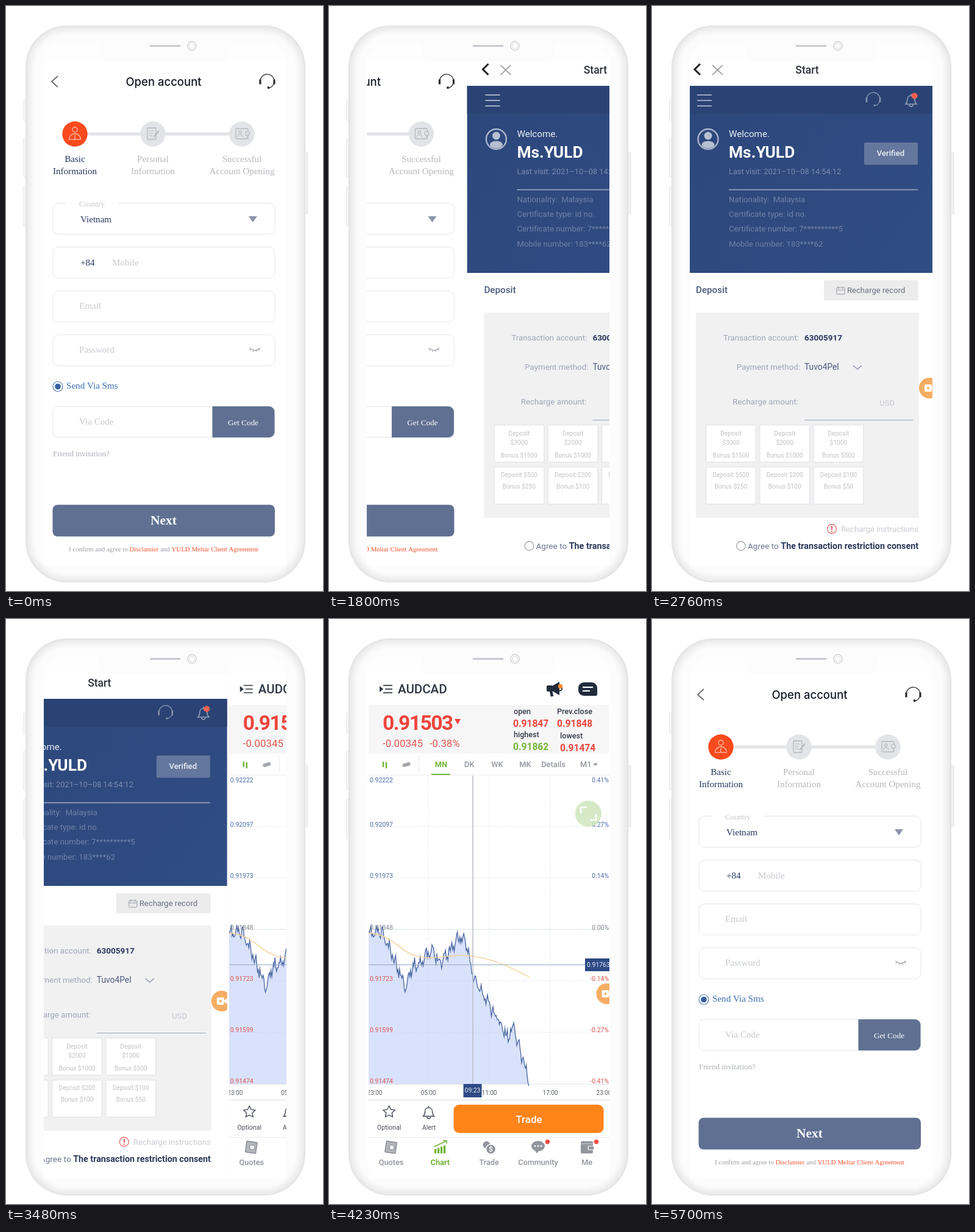
Write an HTML page with a canvas that moves like this. It is 520 px wide and 960 px high and loops after 5730 ms.

```html
<!DOCTYPE html>
<html lang="en">
<head>
<meta charset="utf-8">
<title>Trading app walkthrough</title>
<style>
html, body { margin: 0; width: 100%; height: 100%; overflow: hidden; background: #fff; }
canvas { display: block; width: 520px; height: 960px; }
</style>
</head>
<body>
<canvas id="stage" width="520" height="960"></canvas>
<script>
const c = document.getElementById('stage').getContext('2d');
const LOOP = 5730, SLIDE = 470, PI = Math.PI;
const serif = (n, w = 400) => `${w} ${n}px "Liberation Serif", serif`;
const sans = (n, w = 400) => `${w} ${n}px Roboto, sans-serif`;
const clamp = (v, lo, hi) => Math.min(hi, Math.max(lo, v));

function text(s, x, y, font, color, align = 'left') {
  c.font = font;
  c.fillStyle = color;
  c.textAlign = align;
  c.fillText(s, x, y);
}
function paint(fill, stroke, w = 1) {
  if (fill) { c.fillStyle = fill; c.fill(); }
  if (stroke) { c.strokeStyle = stroke; c.lineWidth = w; c.stroke(); }
}
function rect(x, y, w, h, color) {
  c.fillStyle = color;
  c.fillRect(x, y, w, h);
}
function box(x, y, w, h, r, fill, stroke, lw) {
  c.beginPath();
  c.roundRect(x, y, w, h, r);
  paint(fill, stroke, lw);
}
function disc(x, y, r, fill, stroke, lw) {
  c.beginPath();
  c.arc(x, y, r, 0, 2 * PI);
  paint(fill, stroke, lw);
}
function arc(x, y, r, a, b, color, w) {
  c.beginPath();
  c.arc(x, y, r, a * PI, b * PI);
  paint(null, color, w);
}
function path(points) {
  c.beginPath();
  for (const [x, y] of points) c.lineTo(x, y);
}
function seg(x, y, u, v, color, w) { path([[x, y], [u, v]]); paint(null, color, w); }
const hline = (x, u, y, color, w) => seg(x, y, u, y, color, w);
const vline = (x, y, v, color, w) => seg(x, y, x, v, color, w);

// A tip with two arms, opening right or up
const openRight = (x, y, dx, dy) => path([[x + dx, y - dy], [x, y], [x + dx, y + dy]]);
const openUp = (x, y, dx, dy) => path([[x - dx, y - dy], [x, y], [x + dx, y - dy]]);

function headset(x, y, r, color, cup, w) {
  arc(x, y, r, 0.95, 2.05, color, w);
  for (const side of [-r, r]) vline(x + side, y - 3, y + 5, cup, w * 2);
  arc(x, y, r, 0.1, 0.42, color, w);
  disc(x + 2, y + r - 1, w * 1.2, cup);
}
function bell(x, y, color, w) {
  c.beginPath();
  c.moveTo(x - 9, y + 6);
  c.quadraticCurveTo(x - 6, y + 3, x - 6, y - 2);
  c.bezierCurveTo(x - 6, y - 10, x + 6, y - 10, x + 6, y - 2);
  c.quadraticCurveTo(x + 6, y + 3, x + 9, y + 6);
  c.closePath();
  paint(null, color, w);
  arc(x, y + 7, 3, 0, 1, color, w);
  vline(x, y - 11, y - 8, color, w);
}
function star(x, y, r, color) {
  path(Array.from({ length: 10 }, (_, i) => {
    const d = i % 2 ? r / 2 : r, a = i * PI / 5;
    return [x + d * Math.sin(a), y - d * Math.cos(a)];
  }));
  c.closePath();
  paint(null, color, 1.4);
}
function camera(x, y) {
  disc(x, y, 17, '#f5ad63');
  box(x - 8, y - 6, 12, 12, 2, '#fff');
  openRight(x + 3, y, 6, 5);
  paint('#fff');
  disc(x - 2, y, 2, '#f5ad63');
}

function phone() {
  rect(0, 0, 520, 960, '#fff');
  for (const [y, h] of [[154, 34], [217, 64], [296, 65]]) box(28.5, y, 5, h, 2, '#f6f6f7', '#e9e9ec');
  box(489, 240, 6, 101, 2, '#f1f1f3', '#e3e3e7');
  const rim = 16;
  for (let i = 0; i <= rim; i++) {
    const v = Math.round(225 + 27 * (i / rim) ** 0.6);
    box(32 + i, 32 + i, 459 - 2 * i, 914 - 2 * i, 68 - i, `rgb(${v},${v},${v + 1})`);
  }
  box(62, 60, 398, 858, 34, '#fefefe');
  box(152, 52, 218, 42, [0, 0, 24, 24], '#fcfcfc');
  box(235, 62.5, 52, 5, 2.5, '#f7f7f9');
  hline(236, 286, 65.5, '#b4b6c3', 1.8);
  disc(305, 65.5, 7.3, '#f8f8f8', '#cfcfd3', 1.2);
  disc(305, 65.5, 4.3, '#fff', '#d9d9dd');
}

function person(x, y, color) {
  disc(x, y - 7, 4, null, color, 1.3);
  arc(x, y + 9, 9.5, 1, 2, color, 1.3);
  hline(x - 10, x + 10, y + 9, color, 1.3);
  vline(x, y + 2, y + 9, color, 1.3);
}
function sheet(x, y, color) {
  box(x - 9, y - 10, 14, 19, 1, null, color, 1.3);
  for (let i = 0; i < 3; i++) hline(x - 6, x + 1 - i, y - 5 + 4 * i, color);
  seg(x + 1, y + 5, x + 10, y - 5, color, 2);
}
function badge(x, y, color) {
  box(x - 10, y - 9, 20, 17, 2, null, color, 1.3);
  disc(x - 3, y - 3, 2.2, null, color, 1.2);
  arc(x - 3, y + 5, 4, 1, 2, color, 1.2);
  disc(x + 9, y - 1, 3.4, '#e3e4e8', color, 1.2);
  vline(x + 9, y + 2, y + 7, color, 1.3);
}
function closedEye(x, y, color) {
  const r = 11, cy = y - r;
  arc(x, cy, r, 0.22, 0.78, color, 1.3);
  for (let i = 0; i < 4; i++) {
    const a = (0.3 + i * 0.133) * PI, u = Math.cos(a), v = Math.sin(a);
    seg(x + r * u, cy + r * v, x + (r + 3) * u, cy + (r + 3) * v, color, 1.2);
  }
}

function signup() {
  const pale = '#c6c8ce', navy = '#27375f', slate = '#5f7092', red = '#f4512c', ash = '#b7b8bd';
  const body = serif(15.1);
  openRight(75, 124, 10, 9);
  paint(null, '#444', 1.5);
  text('Open account', 258.5, 130.5, '500 18.5px Inter, sans-serif', '#151a26', 'center');
  headset(428.5, 123.5, 11.5, '#555', '#2b2b2b', 1.6);

  hline(133, 368, 210, '#e3e4e8', 5);
  const step = (x, label, icon, active) => {
    disc(x, 210, 20.7, active ? '#fb4a1d' : '#e3e4e8');
    icon(x, 210, active ? '#ffc0ae' : ash);
    label.forEach((s, i) => text(s, x, 256 + 20 * i, body, active ? navy : ash, 'center'));
  };
  step(113, ['Basic', 'Information'], person, true);
  step(241, ['Personal', 'Information'], sheet);
  step(387, ['Successful', 'Account Opening'], badge);

  const field = y => box(77, y, 364, 51, 9, '#fff', '#ececf0', 1.3);
  ['', '', 'Email', 'Password'].forEach((s, i) => {
    field(323.5 + 72 * i);
    text(s, 120, 353 + 72 * i, body, pale);
  });
  rect(98, 321, 86, 5, '#fff');
  text('Country', 120, 329, serif(12.8), pale);
  text('Vietnam', 122, 355, body, navy);
  openUp(405, 355, 7, 10);
  paint('#8d95a9');
  text('+84', 122, 426, body, navy);
  text('Mobile', 174, 426, body, pale);
  closedEye(408, 565, '#a5a8b0');
  disc(85, 624.5, 8, '#fff', '#4d7cb8', 1.2);
  disc(85, 624.5, 4.8, '#35609f');
  text('Send Via Sms', 99, 628, body, '#3b6fb3');
  field(657);
  text('Via Code', 120, 687, body, pale);
  box(338.5, 657, 102, 51, [0, 9, 9, 0], slate);
  text('Get Code', 389, 688, serif(13.2), '#fff', 'center');
  text('Friend invitation?', 77, 739, serif(13), '#acafb7');
  box(76.5, 818.5, 364.5, 52, 8, slate);
  text('Next', 258.5, 851, serif(21.5, 700), '#fff', 'center');

  let x = 103;
  ['I confirm and agree to ', 'Disclamier', ' and ', 'YULD Meltar Client Agreement'].forEach((s, i) => {
    text(s, x, 895, serif(10.9), i % 2 ? red : '#9b9da5');
    x += c.measureText(s).width;
  });
}

function deposit() {
  openRight(70, 104, 9, 9);
  paint(null, '#222', 3);
  for (const d of [-8, 8]) seg(99, 105 - d, 116, 105 + d, '#8c8e96', 1.5);
  text('Start', 254.5, 111, sans(17.5, 500), '#2d313a', 'center');

  const sky = c.createLinearGradient(44, 131, 464, 438);
  sky.addColorStop(0, '#2c477b');
  sky.addColorStop(1, '#304d84');
  rect(44, 131, 420, 307, sky);
  rect(44, 131, 420, 46, '#2a4374');
  for (let i = 0; i < 3; i++) hline(74, 98, 146 + 9 * i, '#a7b1c7', 1.8);
  headset(363, 153, 11, '#8492b0', '#8492b0', 1.3);
  bell(425, 155, '#97a3be', 1.5);
  disc(430.5, 147.5, 5, '#ff6152');

  disc(92, 218.5, 16.5, null, '#aab5cb', 2.4);
  disc(92, 213, 6.5, '#b7c0d3');
  c.beginPath();
  c.ellipse(92, 227.5, 10.5, 6, 0, 0, 2 * PI);
  paint('#b7c0d3');

  text('Welcome.', 126, 215, sans(15.2), '#e9edf5');
  text('Ms.YULD', 126, 249, sans(26.4, 700), '#fff');
  box(348, 224, 88, 36.5, 2, '#64779d');
  text('Verified', 391.5, 246, sans(13.2, 500), '#eceff6', 'center');
  text('Last visit: 2021–10–08 14:54:12', 126, 276, sans(12.8), '#7a8cb0');
  hline(126, 436, 301.5, '#a1adc6', 1.3);
  ['Nationality:  Malaysia', 'Certificate type: id no.', 'Certificate number: 7**********5', 'Mobile number: 183****62']
    .forEach((s, i) => text(s, 126, 322 + i * 24.2, sans(13.2), '#7083aa'));

  text('Deposit', 72, 471, sans(15.2, 500), '#4b5a7c');
  box(282, 450, 154.5, 33, 2, '#ececec');
  box(303, 462, 13, 11, 1, null, '#9a9da5');
  hline(303, 316, 466, '#9a9da5');
  for (const x of [306, 313]) vline(x, 460, 464, '#9a9da5');
  text('Recharge record', 320, 471, sans(13.1), '#6b7182');

  rect(72, 503, 366, 337, '#f1f1f2');
  const row = (label, x, y) => text(label, x, y, sans(13.3), '#9fa6b7', 'right');
  row('Transaction account:', 241, 549);
  row('Payment method:', 243, 597);
  row('Recharge amount:', 240, 654);
  text('63005917', 250, 549, sans(13.5, 700), '#27365c');
  text('Tuvo4Pel', 250, 597, sans(13.8), '#4c5a7d');
  openUp(337, 596, 7, 6);
  paint(null, '#8d96ab', 1.5);
  text('USD', 398, 656, sans(13), '#c6c8cf', 'right');
  hline(250, 429, 679.5, '#9aa6b3', 1.2);

  [3000, 2000, 1000, 500, 200, 100].forEach((pay, i) => {
    const low = i > 2, x = 88.5 + (i % 3) * 88.2, y = low ? 756.5 : 687.5;
    const put = (s, dy) => text(s, x + 41, y + dy, sans(10.2), '#c1c2c7', 'center');
    box(x, y, 82, 61, 2, '#fff', '#e5e7e9', 1.6);
    if (low) put(`Deposit $${pay}`, 16.5);
    else { put('Deposit', 17.5); put(`$${pay}`, 32.5); }
    put(`Bonus $${pay / 2}`, low ? 35.5 : 53.5);
  });

  disc(295, 858, 7.5, '#fff', '#e0706c', 1.3);
  vline(295, 853.5, 859.5, '#d8433e', 1.7);
  disc(295, 862, 1, '#d8433e');
  text('Recharge instructions', 437, 863, sans(13.1), '#c8cad0', 'right');
  disc(146, 886, 7.3, '#fff', '#9a9ca4', 1.2);
  text('Agree to', 157, 891, sans(13.6), '#6e778d');
  text('The transaction restriction consent', 437, 891, sans(14.3, 700), '#2a3859', 'right');
  camera(455, 627);
}

// Turning points of the price; ripple and seeded jitter fill in the rest
const turns = [[65, 518], [86, 513], [126, 602], [136, 572], [170, 546], [184, 562], [215, 520],
  [228, 542], [237, 590], [280, 662], [294, 690], [301, 664], [328, 756]];

function makeQuotes() {
  let seed = 11, i = 0;
  const rnd = () => (seed = seed * 16807 % 2147483647) / 2147483647;
  const out = [];
  for (let x = 65; x < 328; x += 1.3) {
    while (turns[i + 1][0] < x) i++;
    const [x0, y0] = turns[i], [x1, y1] = turns[i + 1];
    const y = y0 + (x - x0) / (x1 - x0) * (y1 - y0);
    out.push([x, y + 6 * Math.sin(x * 0.62) + (rnd() - 0.5) * 17]);
  }
  return out;
}
const quotes = makeQuotes();

function graph() {
  const grid = '#e7e8ec', f = sans(10.4);
  c.setLineDash([3, 2]);
  for (let i = 1; i < 6; i++) hline(65, 460, 256 + 84.4 * i, grid);
  for (let i = 0; i < 3; i++) vline(163 + 100 * i, 257, 763, grid);
  c.setLineDash([]);
  hline(65, 460, 509.5, '#dce9e4', 1.2);
  hline(65, 460, 763.5, '#dfe1e6');

  path([[65, 763], ...quotes, [328, 763]]);
  paint('rgba(186,203,248,0.55)');
  path(quotes);
  paint(null, '#4664a2', 1.3);
  c.beginPath();
  c.moveTo(65, 515);
  c.bezierCurveTo(115, 520, 115, 556, 165, 556);
  c.bezierCurveTo(205, 556, 235, 536, 329, 588);
  paint(null, '#f3cf93', 1.3);

  vline(236, 257, 763, '#b9bcc6', 1.5);
  hline(65, 460, 567.5, '#8fa8bf', 1.2);
  for (let i = 0; i < 7; i++) {
    const y = Math.max(268, 257 + 84.2 * i);
    const color = i < 3 ? '#4a6da9' : i > 3 ? '#e0554e' : '#83868e';
    text((0.92222 - i * 0.0012467).toFixed(5), 67, y, f, color);
    text(`${((3 - i) * 0.1367).toFixed(2)}%`, 459, y, f, color, 'right');
  }
  rect(420, 557, 40, 21, '#2c4a85');
  text('0.91763', 423, 571, f, '#e6ebf5');
  for (let i = 0; i < 5; i++) {
    const hour = String((23 + 6 * i) % 24).padStart(2, '0');
    text(`${hour}:00`, clamp(63 + 100 * i, 75, 451), 781, sans(10), '#5c606b', 'center');
  }
  rect(220.5, 763, 30, 22, '#2c4a85');
  text('09:23', 235.5, 777, f, '#e6ebf5', 'center');
}

function navIcons(gray, green) {
  c.save();
  c.translate(102, 867);
  c.rotate(0.15);
  box(-9, -9, 17, 18, 1, '#b4b6bc', '#8c8f97', 1.6);
  disc(1, 0, 4, '#f5f5f6', '#8c8f97', 1.3);
  c.restore();

  for (let i = 0; i < 4; i++) vline(174.5 + 5 * i, 877, 870 - 2 * i, green, 3.4);
  seg(172, 866, 192, 857, green, 1.7);
  path([[187, 856], [193, 856], [193, 861]]);
  paint(null, green, 1.5);

  disc(258.5, 863, 6, gray);
  disc(265.5, 870, 8, gray, '#fff', 1.5);
  text('$', 265.5, 874, sans(11, 700), '#fff', 'center');

  c.beginPath();
  c.ellipse(343, 865, 11, 8.5, 0, 0, 2 * PI);
  paint(gray);
  openUp(341, 877, 4, 6);
  paint(gray);
  for (let i = -1; i < 2; i++) disc(343 + 5 * i, 865, 1.4, '#fff');

  box(413, 857, 20, 20, 2, gray);
  hline(413, 433, 861, '#c8c9ce', 1.2);
  box(425, 865, 10, 6, 2, gray, '#fff', 1.2);
  for (const x of [358.5, 438.5]) disc(x, 858, 3.7, '#f2503f');
}

function chart() {
  const red = '#ee453c', green = '#76b539', ink = '#2f3642', gray = '#92959d', dark = '#202c3c';
  path([[83, 110], [89, 115], [83, 120]]);
  paint(ink);
  for (let i = 0; i < 3; i++) hline(i === 1 ? 92 : 89, 104, 109 + 6 * i, ink, 1.7);
  text('AUDCAD', 113, 122, sans(20.5, 500), ink);
  box(357, 109, 10, 10, 2, dark);
  path([[366, 110], [378, 103], [378, 125], [366, 118]]);
  paint(dark);
  seg(364, 118, 366, 127, dark, 4.5);
  arc(378, 114, 4, -0.5, 0.5, dark, 2);
  disc(379.5, 110.5, 3.7, '#ff8a2b');
  box(409, 104, 31, 22, [9, 9, 2, 9], dark);
  hline(416, 433, 112, '#fff', 2.2);
  hline(416, 428, 118, '#fff', 2.2);

  rect(65, 141, 394, 80, '#f6f6f7');
  c.letterSpacing = '-1.5px';
  text('0.91503', 88, 182, sans(33.5, 700), red);
  c.letterSpacing = '0px';
  openUp(211, 173, 5, 9);
  paint(red);
  text('-0.00345', 88, 210, sans(16.9), '#e2574e');
  text('-0.38%', 165, 210, sans(16.7), '#e2574e');
  const stat = (name, x, y, value, vx, color) => {
    text(name, x, y, sans(12.6, 500), '#353a45');
    text(value, vx, y + 21, sans(15.6, 700), color);
  };
  stat('open', 303, 156, '0.91847', 302, red);
  stat('highest', 303, 194, '0.91862', 302, green);
  stat('Prev.close', 374, 156, '0.91848', 374, red);
  stat('lowest', 379, 196, '0.91474', 379, red);

  vline(89, 234, 243, green, 2.5);
  vline(94, 235, 245, green, 2.5);
  for (let i = 0; i < 3; i++) disc(123.5 + 3.5 * i, 240 - i, 3, '#a5a7ad');
  vline(147.5, 224, 252, '#ececee');
  ['MN', 'DK', 'WK', 'MK', 'Details'].forEach((s, i) =>
    text(s, 184 + 46 * i, 243, sans(12.8, i ? 500 : 700), i ? gray : green, 'center'));
  text('M1', 412, 243, sans(12.8, 500), gray);
  openUp(437, 241, 4, 4);
  paint(gray);
  hline(65, 460, 256, '#ebebed');
  hline(168, 199, 255, green, 2);

  graph();
  disc(425.3, 319.5, 21.5, 'rgba(206,230,189,0.85)');
  for (const d of [-1, 1]) {
    const x = 425.5 + 12.5 * d, y = 319.5 + 10.5 * d;
    path([[x, y - 10 * d], [x, y], [x - 10 * d, y]]);
    paint(null, '#fff', 2.5);
  }
  camera(455.5, 615);

  hline(65, 460, 789.5, '#e4e5e8', 1.3);
  star(98.5, 809, 10, '#444a57');
  bell(163.5, 810, '#444a57', 1.4);
  text('Optional', 98.5, 838, sans(10.6), '#474c58', 'center');
  text('Alert', 164, 838, sans(10.3), '#474c58', 'center');
  box(204.5, 797, 246, 46.5, 9, '#ff8419');
  text('Trade', 328, 827, sans(17, 500), '#fff', 'center');
  hline(65, 460, 850.5, '#ebebee');
  navIcons(gray, green);
  ['Quotes', 'Chart', 'Trade', 'Community', 'Me'].forEach((s, i) =>
    text(s, 102 + 80.3 * i, 896, sans(12.7, i === 1 ? 700 : 500), i === 1 ? green : gray, 'center'));
}

const A = { draw: signup, x: 62, w: 398 };
const B = { draw: deposit, x: 44, w: 420 };
const C = { draw: chart, x: 65, w: 395 };
const slides = [
  { start: 1546, from: A, to: B, gap: 418 },
  { start: 3327, from: B, to: C, gap: 402 },
  { start: 5150, from: C, to: A, gap: 404 },
];

function show(screen, dx) {
  const { x, w, draw } = screen;
  c.save();
  c.translate(dx, 0);
  c.beginPath();
  c.rect(x, 90, w, 828);
  c.clip();
  rect(x, 90, w, 828, '#fff');
  draw();
  c.restore();
}
function render(t) {
  phone();
  c.save();
  c.beginPath();
  c.rect(62, 90, 398, 828);
  c.clip();
  const { start, from, to, gap } = slides.find(s => t < s.start + SLIDE) || { ...slides[0], start: LOOP };
  const k = clamp((t - start) / SLIDE, 0, 1);
  const shift = gap * k * k * (3 - 2 * k);
  show(from, -shift);
  if (k > 0) show(to, gap - shift);
  c.restore();
}

const begin = performance.now();
function loop() {
  render((performance.now() - begin) % LOOP);
  requestAnimationFrame(loop);
}
loop();
</script>
</body>
</html>
```
